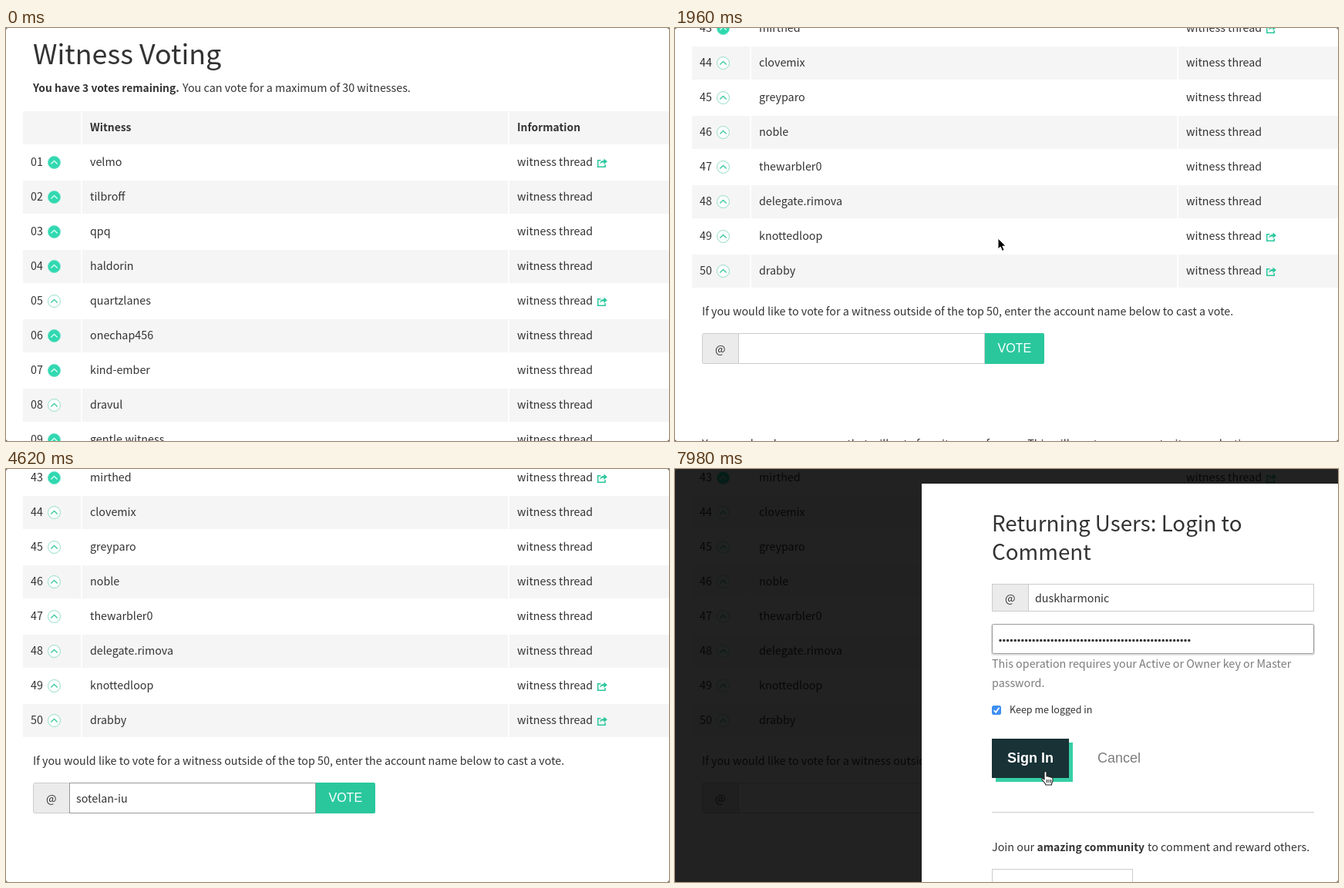
An HTML page for the animation above (8000 ms loop, 860 by 536 pixels).

```html
<!DOCTYPE html>
<html lang="en">
<head>
<meta charset="utf-8">
<title>Witness Voting</title>
<style>
  html, body { margin: 0; width: 100%; height: 100%; overflow: hidden; background: #fff; }
  svg { display: block; width: 860px; height: 536px; }
  text { font-family: "Noto Sans CJK SC", "Noto Sans CJK JP", "Noto Sans CJK", "Open Sans", sans-serif; fill: #333; white-space: pre; }
  text.ui { font-family: "Liberation Sans", Arial, sans-serif; }
  text.light { fill: #fff; }
  text.muted { fill: #7c7c7c; }
</style>
</head>
<body>
<svg id="stage" viewBox="0 0 860 536" xmlns="http://www.w3.org/2000/svg"></svg>
<script>
const LOOP = 8000, STEP = 70, PITCH = 45, FORM_SCROLL = 2053;
const TEAL = '#2ac79d', BRIGHT = '#2fdcb5', STRIPE = '#f5f5f5', BORDER = '#ccc', FOCUS = '#999';

// "+" marks a cast vote, "*" an external link
const witnesses = `+velmo* +tilbroff +qpq +haldorin quartzlanes* +onechap456 +kind-ember dravul
  +gentle.witness +ambrook +quillnest +tarvo +pebblecat +mistrello +meadowfin +thepuzzlewheel
  +dovaresk +vornik +calm.witness birtovel +noahbriars.qkqk zepaluo corvyfernwick yombex dwip
  solvandre plonkety +orvale dimbrook +sabrello +tuftmoor wexley.node +gorbin pellandra +hushvale
  +mapletun kirrow vandible tunebark witness.qol +zolpebrand.com +hillcrumb +mirthed* clovemix
  greyparo noble thewarbler0 delegate.rimova knottedloop* drabby*`.split(/\s+/);
const account = 'sotelan-iu';

const clamp = k => Math.min(1, Math.max(0, k));
const progress = (t, from, to) => clamp((t - from) / (to - from));
const smooth = k => k * k * (3 - 2 * k);
const mix = (a, b, k) => a + (b - a) * k;

// A wheel flick: quick start, long momentum tail
const flick = (t, start, distance, tau) =>
  distance * (1 - Math.exp(-((Math.max(0, t - start) / tau) ** 1.715)));
const scrollAt = t => Math.round(flick(t, 560, 1905, 402.5) + flick(t, 1750, 185, 141)
  - 37 * smooth(progress(t, 2100, 2590)));

const moves = [
  { from: 0, to: 350, x: 419, y: 273 },
  { from: 2310, to: 2590, x: 416, y: 420 },
  { from: 2590, to: 2660, x: 268, y: 428 },
  { from: 5040, to: 5600, x: 432, y: 420 },
  { from: 6230, to: 6650, x: 640, y: 220 },
  { from: 7350, to: 7910, x: 480.5, y: 393 },
];
const cursorAt = t => moves.reduce((p, m) => {
  const k = smooth(progress(t, m.from, m.to));
  return { x: mix(p.x, m.x, k), y: mix(p.y, m.y, k) };
}, { x: 560, y: 530 });

// Latin glyphs of the CJK face are drawn larger than the nominal size
const text = (x, y, s, size = 16, attrs = '') =>
  `<text x="${x}" y="${y}" font-size="${(size / 1.117).toFixed(2)}" ${attrs}>${s}</text>`;
const bold = (x, y, s) => text(x, y, s, 15.5, 'font-weight="600"');
const ui = (x, y, s, size, cls, weight = 400) =>
  `<text class="ui ${cls}" x="${x}" y="${y}" font-size="${size}" font-weight="${weight}">${s}</text>`;
const rect = (x, y, w, h, fill, attrs = '') =>
  `<rect x="${x}" y="${y}" width="${w}" height="${h}" fill="${fill}" ${attrs}/>`;
const outlined = (x, y, w, h, fill, attrs = '') =>
  rect(x + .5, y + .5, w - 1, h - 1, fill, `stroke="${BORDER}" ${attrs}`);

const stripe = y => [[22, 75], [99, 552], [653, 207]].map(([x, w]) => rect(x, y, w, 43, STRIPE)).join('');

const voteIcon = (y, on) => `<g transform="translate(62.5 ${y})">
  <circle r="8" fill="${on ? '#30d8b0' : '#fbfffd'}" stroke="${on ? '#6be2c6' : '#93dcc6'}"/>
  <path d="M-4.2 2L0-2 4.2 2" fill="none" stroke="${on ? '#d5fff2' : '#43c9a3'}" stroke-width="1.4"/></g>`;

const shareIcon = y => `<g transform="translate(767 ${y})" fill="${TEAL}">
  <path d="M4.5-2.2H.8v8.4h9.4V3" fill="none" stroke="${TEAL}" stroke-width="1.5"/>
  <path d="M3.2 3C3.500-.5 5.500-2 8.500-2v-2.500L13-.7 8.500 3V.6C6 .6 4.500 1.200 3.200 3z"/></g>`;

function row(entry, i) {
  const y = 174 + PITCH * i;
  return (i % 2 ? stripe(y - 21) : '') +
    text(32, y + 5, String(i + 1).padStart(2, '0')) + voteIcon(y + .5, entry.startsWith('+')) +
    text(109, y + 5, entry.replace(/[+*]/g, '')) + text(663, y + 5, 'witness thread') +
    (entry.endsWith('*') ? shareIcon(y) : '');
}

const page = `<g id="page">
  ${text(35, 47, 'Witness Voting', 40)}
  ${bold(35, 83, 'You have 3 votes remaining.')}
  ${text(229, 83, 'You can vote for a maximum of 30 witnesses.')}
  ${stripe(108)}${bold(109, 134, 'Witness')}${bold(663, 134, 'Information')}
  ${witnesses.map(row).join('')}
  <g transform="translate(0 ${FORM_SCROLL})">
    ${text(35, 384, 'If you would like to vote for a witness outside of the top 50, enter the account name below to cast a vote.')}
    ${outlined(35, 407, 48, 40, '#ebebeb', 'rx="2"')}
    ${text(52, 433, '@')}
    ${outlined(82, 407, 320, 40, '#fff', 'id="field"')}
    ${text(91, 433, '', 16, 'id="typed"')}
    ${rect(400, 405, 81, 44, '#d9f8ef', 'id="glow" rx="3"')}
    <path id="vote" d="M402 407h75q2 0 2 2v36q0 2-2 2h-75z"/>
    ${ui(418.5, 432, 'VOTE', 16, 'light')}
    ${text(35, 556, 'You can also choose a proxy that will vote for witnesses for you. This will reset your current witness selection.')}
  </g>
</g>`;

const dialog = `<g id="modal">
  ${rect(0, 0, 860, 536, '#000', 'opacity=".865"')}
  ${rect(320, 19, 540, 517, '#fff')}
  ${text(411, 81, 'Returning Users: Login to', 31)}${text(411, 118, 'Comment', 31)}
  ${outlined(411, 149, 418, 36, '#fff')}${outlined(411, 149, 48, 36, '#ebebeb')}
  ${text(428, 173, '@')}${text(467, 173, 'duskharmonic')}
  ${rect(410, 201, 420, 41, '#e2e2e2', 'id="ring" rx="3"')}
  ${outlined(411, 201, 418, 39, '#fff', 'id="secret" rx="2"')}
  <path id="dots" d="M422 222.5H667" stroke="#333" stroke-width="3.5" stroke-linecap="round" stroke-dasharray="0 4.8"/>
  ${text(411, 258, 'This operation requires your Active or Owner key or Master', 16, 'class="muted"')}
  ${text(411, 283, 'password.', 16, 'class="muted"')}
  ${rect(411, 307, 12, 12, '#3f8ff0', 'rx="2.5"')}
  <path d="M413.8 313.2l2.4 2.6 4.3-6" fill="none" stroke="#fff" stroke-width="1.7"/>
  ${text(434, 317, 'Keep me logged in', 14)}
  ${rect(416, 355, 100, 51, '#36cfa5')}${rect(411, 350, 100, 51, '#171f24', 'id="signIn"')}
  ${ui(431, 381, 'Sign In', 18, 'light', 700)}${ui(548, 381, 'Cancel', 18, 'muted')}
  ${rect(411, 445, 418, 1, BORDER)}
  ${text(411, 496, 'Join our')}${bold(469.5, 496, 'amazing community')}${text(613, 496, 'to comment and reward others.')}
  ${outlined(411, 519, 183, 41, '#fff')}
</g>`;

const cursors = `<g id="cursor" stroke-linejoin="round">
  <path id="arrow" d="M0 0v14l3.2-3 2.300 5.400 2.600-1.100-2.300-5.200h4.400z" fill="#000" stroke="#fff"/>
  <path id="beam" d="M-3-8q3 0 3 2V6q0 2-3 2M3-8q-3 0-3 2V6q0 2 3 2" fill="none" stroke="#222"/>
  <path id="hand" d="M-1.500 1q0-1.500 1.500-1.500t1.500 1.500v5q2-1 3 .5 2-.6 2.700.8 2.300-.3 2.300 2v3l-1.500 3.200v1.500H.5l-1-2-4-5q-.5-2 1.500-1.500l1.500 1.500z
    M2 10v4M4.500 10v4M7 10v4" fill="#fff" stroke="#222" stroke-width="1.1"/>
</g>`;

const windowCorners = '<path d="M0 0H860V536H0zM3 0Q0 0 0 3V533Q0 536 3 536H857Q860 536 860 533V3Q860 0 857 0z" fill="#444" fill-rule="evenodd"/>';
document.getElementById('stage').innerHTML = page + dialog + cursors + windowCorners;

const $ = id => document.getElementById(id);
const set = (id, name, value) => $(id).setAttribute(name, value);
const show = (id, on) => set(id, 'visibility', on ? 'inherit' : 'hidden');
const within = (t, from, to) => t >= from && t < to;

function draw(t) {
  const { x, y } = cursorAt(t);
  const hover = within(t, 5040, 6230) && x > 402;
  const typedCount = clamp((t - 3300) / 1320) * account.length;

  set('page', 'transform', `translate(0 ${-scrollAt(t)})`);
  set('field', 'stroke', within(t, 2800, 5950) ? FOCUS : BORDER);
  $('typed').textContent = t < 6020 ? account.slice(0, Math.floor(typedCount)) : '';
  set('vote', 'fill', hover ? BRIGHT : TEAL);
  show('glow', hover);

  set('modal', 'opacity', progress(t, 5950, 6230));
  show('modal', t > 5950);
  set('secret', 'stroke', t >= 6720 ? FOCUS : BORDER);
  show('ring', t >= 6720);
  show('dots', t >= 7140);
  set('signIn', 'fill', t > 7910 ? '#183236' : '#171f24');

  const beam = within(t, 2660, 5250) || within(t, 6650, 7490);
  const hand = hover || t >= 7770;
  const hidden = t < 70 || within(t, 3360, 5040) || within(t, 7140, 7350);
  set('cursor', 'transform', `translate(${x} ${y})`);
  set('cursor', 'visibility', hidden ? 'hidden' : 'visible');
  show('beam', beam);
  show('hand', hand);
  show('arrow', !beam && !hand);
}

const start = performance.now();
function tick(now) {
  const t = Math.max(0, now - start) % LOOP;
  draw(Math.floor(t / STEP) * STEP);
  requestAnimationFrame(tick);
}
draw(0);
requestAnimationFrame(tick);
</script>
</body>
</html>
```
